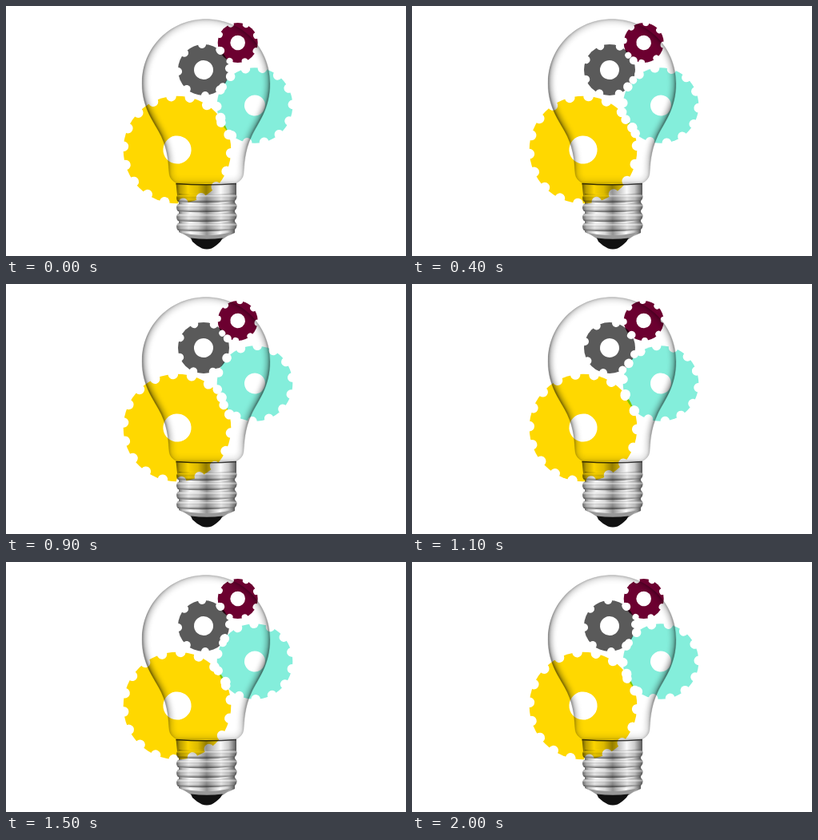
Animation, 500 px wide and 313 px high, one loop 2.1 s. Source, as an HTML page:

```html
<!DOCTYPE html>
<html lang="en">
<head>
<meta charset="utf-8">
<title>Light bulb with gears</title>
<style>
  html, body { margin: 0; width: 100%; height: 100%; overflow: hidden; background: #fff; }
  svg { display: block; width: 500px; height: 313px; }
  #discs circle, #bulb { mix-blend-mode: multiply; }
</style>
</head>
<body>
<svg viewBox="0 0 500 313">
  <defs>
    <path id="glass" d="M250 16.5C206 16.5 170 51 170 97C170 129 186 146 194 163C203 182 203 199 204 210Q205 218 214 222H287Q296 218 297 210C298 199 298 182 307 163C315 146 330 129 330 97C330 51 294 16.5 250 16.5Z"/>
    <clipPath id="inside"><use href="#glass"/></clipPath>
    <filter id="soft" x="-20%" y="-20%" width="140%" height="140%"><feGaussianBlur stdDeviation="3.2"/></filter>
    <filter id="fine" x="-20%" y="-20%" width="140%" height="140%"><feGaussianBlur stdDeviation="0.8"/></filter>
    <linearGradient id="shade" gradientUnits="userSpaceOnUse" x1="0" y1="16" x2="0" y2="222">
      <stop offset="0" stop-color="#000" stop-opacity=".14"/>
      <stop offset=".3" stop-color="#000" stop-opacity=".28"/>
      <stop offset=".58" stop-color="#000" stop-opacity=".38"/>
      <stop offset=".82" stop-color="#000" stop-opacity=".26"/>
      <stop offset="1" stop-color="#000" stop-opacity=".1"/>
    </linearGradient>
    <linearGradient id="metal">
      <stop offset="0" stop-color="#6a6a6a"/>
      <stop offset=".07" stop-color="#bcbcbc"/>
      <stop offset=".2" stop-color="#fafafa"/>
      <stop offset=".36" stop-color="#dcdcdc"/>
      <stop offset=".5" stop-color="#949494"/>
      <stop offset=".6" stop-color="#c0c0c0"/>
      <stop offset=".74" stop-color="#fafafa"/>
      <stop offset=".87" stop-color="#cccccc"/>
      <stop offset=".95" stop-color="#868686"/>
      <stop offset="1" stop-color="#555"/>
    </linearGradient>
    <linearGradient id="ridge" x2="0" y2="1">
      <stop offset="0" stop-color="#000" stop-opacity=".2"/>
      <stop offset=".3" stop-color="#fff" stop-opacity=".5"/>
      <stop offset=".65" stop-color="#000" stop-opacity=".03"/>
      <stop offset="1" stop-color="#000" stop-opacity=".6"/>
    </linearGradient>
  </defs>

  <g id="discs"></g>
  <g id="cuts" fill="#fff"></g>
  <g id="bulb">
    <g clip-path="url(#inside)" fill="none" stroke="url(#shade)">
      <use href="#glass" stroke-width="9" filter="url(#soft)"/>
      <use href="#glass" stroke-width="3" filter="url(#fine)"/>
    </g>
    <use href="#glass" fill="none" stroke="#777" stroke-opacity=".3" stroke-width=".8"/>
    <path d="M212.5 222Q250 225 288 222L288 237H214Z" fill="url(#metal)"/>
    <path d="M212.5 222.5Q250 225 288 222.5" fill="none" stroke="#333" stroke-width="1.3"/>
    <path d="M216 235H286V284L271 291H232L216 283Z" fill="url(#metal)"/>
    <g id="thread"></g>
    <path d="M220 284Q250 291 283 283L271 292H232Z" fill="#999"/>
    <path d="M231 290.5Q251 293 271 290.5L268 295Q262 301 257 303.5Q251 305.5 245 303.5Q238 300 233 295Z" fill="#111"/>
  </g>
</svg>
<script>
  const STEP = 100, STEPS = 21;

  // turn: +1 clockwise, -1 anticlockwise; phase: angle of a notch from the top
  const gears = [
    { x: 214, y: 180, r: 67.3, hole: 17.6, notch: 6.3, teeth: 18, phase: 13.6, turn: 1, color: '#ffd800' },
    { x: 311, y: 124.5, r: 47.3, hole: 13, notch: 5.8, teeth: 14, phase: 11.5, turn: -1, color: '#84eedb' },
    { x: 247, y: 80, r: 32, hole: 12, notch: 5, teeth: 8, phase: -3.5, turn: 1, color: '#5a5a5a' },
    { x: 289.7, y: 46, r: 25, hole: 9.3, notch: 4, teeth: 8, phase: 24, turn: 1, color: '#6c0030' }
  ];

  function add(parent, tag, attrs) {
    const el = document.createElementNS('http://www.w3.org/2000/svg', tag);
    for (const key in attrs) el.setAttribute(key, attrs[key]);
    return parent.appendChild(el);
  }

  const byId = id => document.getElementById(id);

  // A gear is a still disc with white notches turning around its rim
  for (const gear of gears) {
    const { x, y, r, hole, notch, teeth, color } = gear;
    add(byId('discs'), 'circle', { cx: x, cy: y, r, fill: color });
    gear.el = add(byId('cuts'), 'g', {});
    add(gear.el, 'circle', { r: hole });
    for (let i = 0; i < teeth; i++)
      add(gear.el, 'circle', { cy: -r, r: notch, transform: `rotate(${360 / teeth * i})` });
  }

  for (let i = 0; i < 4; i++) {
    const y = 235 + i * 12;
    const d = `M215 ${y + 1}Q250 ${y + 3} 286 ${y - 1}Q291 ${y + 4} 286 ${y + 9}Q250 ${y + 13} 215 ${y + 10}Q211 ${y + 5} 215 ${y + 1}Z`;
    add(byId('thread'), 'path', { d, fill: 'url(#metal)' });
    add(byId('thread'), 'path', { d, fill: 'url(#ridge)' });
  }

  // One full turn per loop; the last step repeats the first pose
  function draw(now) {
    const step = Math.floor(now / STEP) % STEPS;
    for (const { el, x, y, phase, turn } of gears) {
      const angle = phase + turn * 360 * step / (STEPS - 1);
      el.setAttribute('transform', `translate(${x} ${y}) rotate(${angle})`);
    }
  }

  const start = performance.now();
  function tick() {
    draw(performance.now() - start);
    requestAnimationFrame(tick);
  }
  tick();
</script>
</body>
</html>
```
